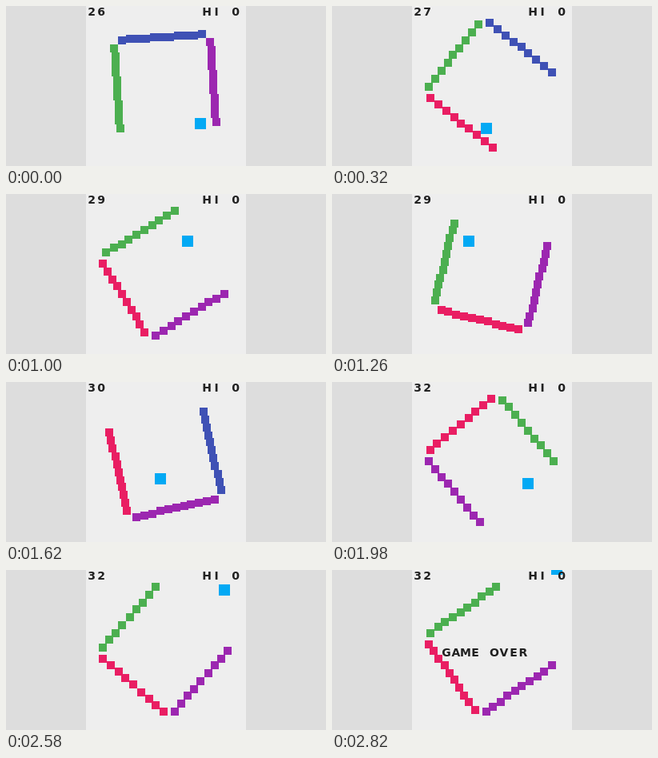
An HTML page with a canvas that plays this animation: 400x200 px, repeating every 3600 ms.

```html
<!DOCTYPE html>
<html lang="en">
<head>
<meta charset="utf-8">
<title>Spinning walls</title>
<style>
  html, body { margin: 0; width: 100%; height: 100%; overflow: hidden; background: #ddd; }
  canvas { display: block; }
</style>
</head>
<body>
<canvas id="stage" width="400" height="200"></canvas>
<script>
const ctx = document.getElementById('stage').getContext('2d');
const LOOP = 3600, STEP = 20, END = 2820;
const UNIT = 2, LEFT = 100, MID = 50;
const RADIUS = 30, LENGTH = 50, THICK = 5, BALL = 7;
const SPIN = 0.176, START_ANGLE = -3.6, START_SCORE = 26;
const walls = ['#4caf50', '#3f51b5', '#9c27b0', '#e91e63'];

// Times at which the steady spin reverses
const flips = [41, 718, 1258, 1999, 2661];

// Ball path: ms, x, y and, at a bounce, the wall that then vanishes
const path = [
  [0, 243, 147, 3],
  [50, 252, 142, 2],
  [370, 183, 156, 3],
  [740, 213, 75],
  [920, 245, 59, 1],
  [1310, 161, 60, 0],
  [1740, 206, 146, 2],
  [1950, 245, 135, 1],
  [2340, 267, 53],
  [END, 281, -1]
];
const bounces = path.filter(p => p.length > 3);

// Each flip mirrors the sweep from that moment on
function angle(t) {
  let sweep = -t, dir = 1;
  for (const f of flips) {
    if (t > f) sweep += 2 * dir * (t - f);
    dir = -dir;
  }
  return START_ANGLE + SPIN * sweep;
}

function ballAt(t) {
  const i = Math.max(1, path.findIndex(p => p[0] >= t));
  const [t0, x0, y0] = path[i - 1], [t1, x1, y1] = path[i];
  const k = (t - t0) / (t1 - t0);
  return [x0 + (x1 - x0) * k, y0 + (y1 - y0) * k];
}

function box(x, y, size) {
  ctx.fillRect(LEFT + Math.floor(x - size / 2) * UNIT, Math.floor(y - size / 2) * UNIT,
    size * UNIT, size * UNIT);
}

// A wall is a row of square blocks snapped to the coarse grid
function wall(deg, color) {
  const a = deg * Math.PI / 180, c = Math.cos(a), s = Math.sin(a);
  const dx = s * LENGTH, dy = -c * LENGTH;
  const x = MID - c * RADIUS - dx / 2, y = MID - s * RADIUS - dy / 2;
  const n = Math.ceil(Math.max(Math.abs(dx), Math.abs(dy)) / THICK);
  ctx.fillStyle = color;
  for (let i = 0; i <= n; i++) box(x + dx * i / n, y + dy * i / n, THICK);
}

function label(str, x, y) {
  ctx.fillStyle = '#212121';
  ctx.font = 'bold 14px "DejaVu Sans", sans-serif';
  ctx.textAlign = 'center';
  [...str].forEach((ch, i) => ctx.fillText(ch, x + 6 + i * 12, y));
}

function draw(t) {
  ctx.fillStyle = '#ddd';
  ctx.fillRect(0, 0, 400, 200);
  ctx.fillStyle = '#eee';
  ctx.fillRect(LEFT, 0, 200, 200);

  const count = bounces.filter(p => p[0] <= t).length - 1;
  const gone = bounces[count][3];
  walls.forEach((color, i) => {
    if (i !== gone) wall(angle(t) + i * 90, color);
  });

  const [x, y] = ballAt(t);
  ctx.fillStyle = '#03a9f4';
  box((x - LEFT) / UNIT, y / UNIT, BALL);

  label(String(START_SCORE + count), 101, 12);
  label('HI 0', 245, 12);
  if (t >= END) label('GAME OVER', 137, 108);
}

const start = performance.now();
function frame() {
  const t = (performance.now() - start) % LOOP;
  draw(Math.min(END, Math.floor(t / STEP) * STEP));
  requestAnimationFrame(frame);
}
frame();
</script>
</body>
</html>
```
